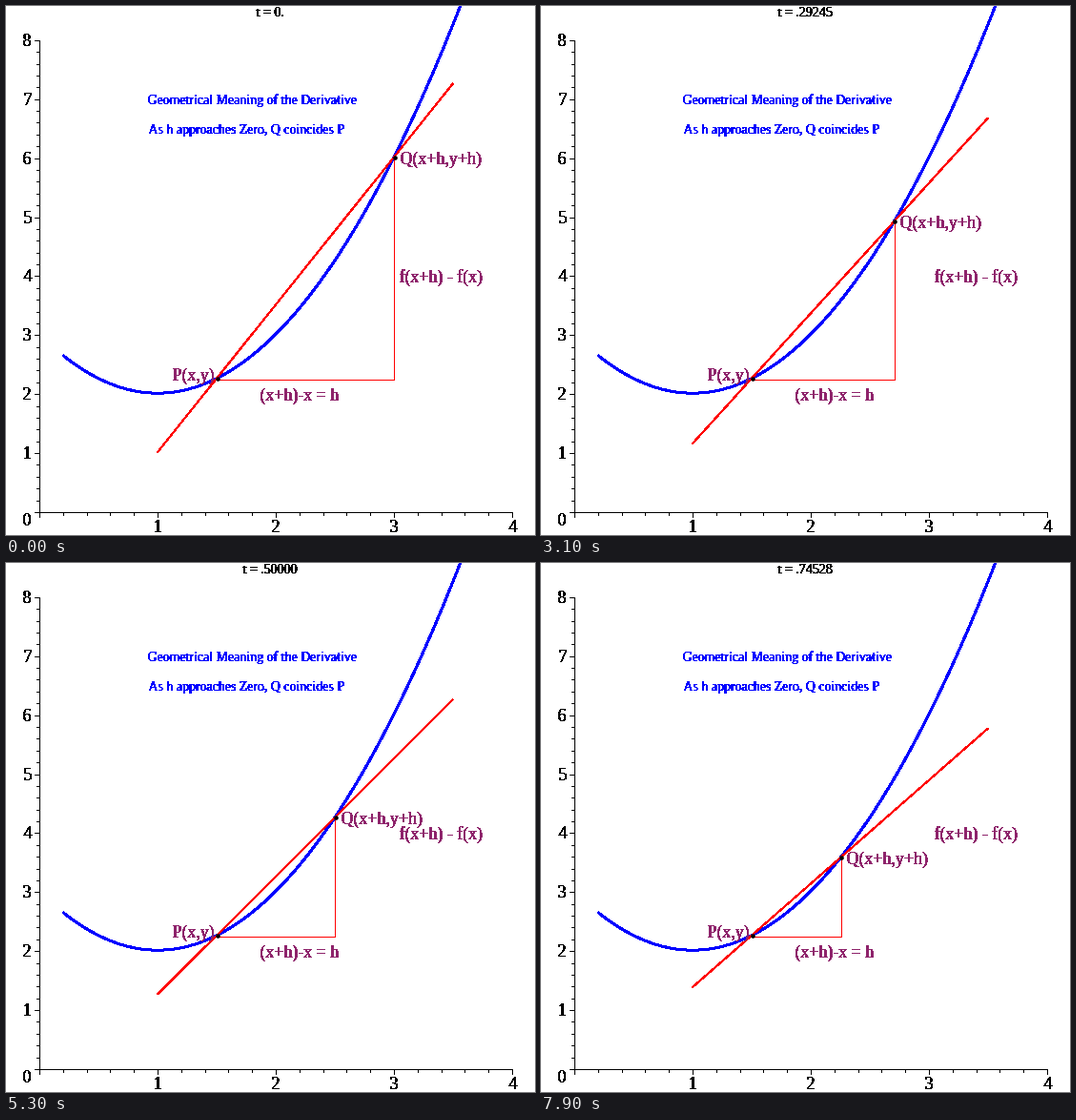
Animation, 555 px wide and 555 px high, one loop 8 s. Source, as a matplotlib script:

```python
import numpy as np
import matplotlib.pyplot as plt
from matplotlib.animation import FuncAnimation

SIZE, DPI = 555, 60
FRAMES, STEPS = 80, 106
PX = 72 / DPI
BLUE, RED, MAROON = "#0000ff", "#ff0000", "#8e236b"

plt.rcParams.update({
    "font.family": "Liberation Serif",
    "text.antialiased": False,
})

fig = plt.figure(figsize=(SIZE / DPI, SIZE / DPI), dpi=DPI, facecolor="white")
ax = fig.add_axes([0, 0, 1, 1])
ax.set(xlim=(0, SIZE), ylim=(SIZE, 0))
ax.axis("off")


def f(x):
    return (x - 1) ** 2 + 2


def px(x):
    return 35 + 124 * np.asarray(x)


def py(y):
    return 530 - 61.9 * np.asarray(y)


def stroke(color, width, z):
    return ax.plot([], [], color=color, lw=width * PX, zorder=z,
                   antialiased=False, solid_capstyle="butt")[0]


def thin(xs, ys, color="black", z=2):
    """One-pixel line along pixel rows and columns."""
    item = stroke(color, 1, z)
    # snapping takes the row above the given edge
    item.set_data(xs, np.asarray(ys) + 1)
    return item


class Label:
    """Text struck twice, one pixel apart, for a bold look."""

    def __init__(self, x, y, s, size=17.9, color="black", ha="center"):
        self.parts = [ax.text(0, 0, s, fontsize=size * PX, color=color,
                              ha=ha, va="baseline", zorder=6)
                      for _ in range(2)]
        self.move(x, y)

    def move(self, x, y):
        for shift, part in enumerate(self.parts):
            part.set_position((x + shift, y))

    def write(self, s):
        for part in self.parts:
            part.set_text(s)


def dot(x, y):
    return ax.plot([px(x) + 0.5], [py(y) + 0.5], "o", color="black",
                   ms=4.6 * PX, mew=0, zorder=5)[0]


def draw_axes():
    thin([35, 35], [py(8), py(0)])
    thin([px(0), px(4)], [530, 530])
    for i in range(41):
        size = 5 if i % 5 == 0 else 3
        y = py(i / 5)
        thin([35 - size, 35], [y, y])
        if i <= 20:
            x = px(i / 5)
            thin([x, x], [530, 530 + size])
    for n in range(1, 9):
        Label(22, py(n) + 7, str(n))
    for n in range(1, 5):
        Label(px(n), 552, str(n))
    Label(22, 545, "0")


def title_text(t):
    """Five significant digits, with an exponent for values under 0.1."""
    if t == 0:
        return "t = 0."
    exp = int(np.floor(np.log10(t))) + 1
    mantissa = f"{t / 10.0 ** exp:.5f}"[1:]
    return f"t = {mantissa}" + (f"e{exp}" if exp else "")


draw_axes()
curve = stroke(BLUE, 2, 2)
xs = np.linspace(0.2, 3.7, 200)
curve.set_data(px(xs), py(f(xs)))
legs = thin([], [], RED, 3)
secant = stroke(RED, 1, 4)
dot(1.5, f(1.5))
q_dot = dot(3, f(3))

Label(258, 103, "Geometrical Meaning of the Derivative", 13.9, BLUE)
Label(252, 134, "As h approaches Zero, Q coincides P", 13.9, BLUE)
Label(196.5, 393, "P(x,y)", color=MAROON)
Label(456, 290, "f(x+h) - f(x)", color=MAROON)
Label(307.5, 414, "(x+h)-x = h", color=MAROON)
q_label = Label(0, 0, "Q(x+h,y+h)", color=MAROON, ha="left")
title = Label(277, 11, "", 14.1)


def update(i):
    t = i / STEPS
    xp, xq = 1.5, 3 - t
    yp, yq = f(xp), f(xq)
    slope = (yq - yp) / (xq - xp)
    ends = np.array([1, 3.5])
    secant.set_data(px(ends), py(yp + slope * (ends - xp)))
    legs.set_data(px([xp, xq, xq]), py([yp, yp, yq]) + 1)
    q_dot.set_data([px(xq) + 0.5], [py(yq) + 0.5])
    q_label.move(px(xq) + 6, py(yq) + 7.5)
    title.write(title_text(t))
    return secant, legs, q_dot, *q_label.parts, *title.parts


anim = FuncAnimation(fig, update, frames=FRAMES, interval=100,
                     repeat=True, repeat_delay=0)
plt.show()
```
